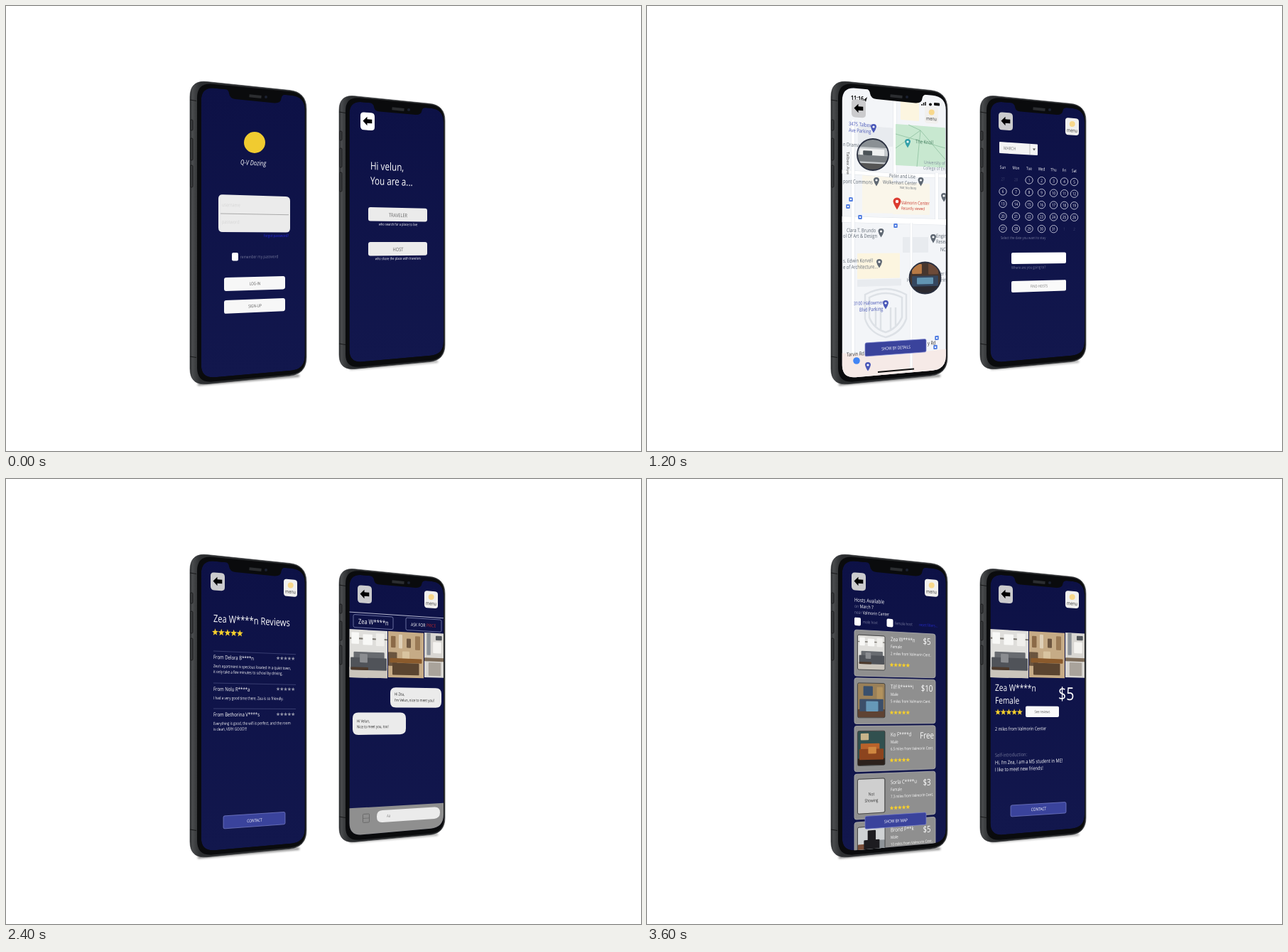
These frames come from a looping animation (894 by 626 pixels, 4800 ms). An HTML page:

```html
<!DOCTYPE html>
<html lang="en">
<head>
<meta charset="utf-8">
<title>App mockup</title>
<style>
html, body { margin: 0; width: 100%; height: 100%; overflow: hidden; background: #fff; }
svg { display: block; width: 894px; height: 626px; font-family: "Open Sans", "Noto Sans", sans-serif; }
</style>
</head>
<body>
<script>
const DIM = '#74789a', PALE = '#ebebeb', GOLD = '#f6cf2c', BTN = '#3a439c', INK = '#5f6873';

// Lines tilt with their height, as both phones are seen at an angle.
const tilt = y => (332 - y) / 2200;
const skew = (x, y, k = 1) => `transform="matrix(${k} ${k * tilt(y)} 0 1 ${x} ${y})"`;

function quad(x0, x1, tl, tr, bl, br, r) {
  const m = (tr - tl) / (x1 - x0) * r, n = (br - bl) / (x1 - x0) * r;
  return `M${x0} ${tl + r}Q${x0} ${tl} ${x0 + r} ${tl + m}L${x1 - r} ${tr - m}Q${x1} ${tr} ${x1} ${tr + r}` +
    `V${br - r}Q${x1} ${br} ${x1 - r} ${br - n}L${x0 + r} ${bl + n}Q${x0} ${bl} ${x0} ${bl - r}Z`;
}
const path = (d, fill = 'none', stroke = 'none', w = 1) =>
  `<path d="${d}" fill="${fill}" stroke="${stroke}" stroke-width="${w}"/>`;
const dot = (x, y, r, fill, stroke = 'none', w = 1) =>
  `<circle cx="${x}" cy="${y}" r="${r}" fill="${fill}" stroke="${stroke}" stroke-width="${w}"/>`;
const box = (x, y, w, h, r, fill, stroke, sw = .8) =>
  path(quad(x, x + w, y, y + tilt(y) * w, y + h, y + h + tilt(y + h) * w, r), fill, stroke, sw);
const text = (x, y, str, size, fill = '#fff', anchor = 'start', extra = '') =>
  `<text ${skew(x, y, .78)} font-size="${size}" fill="${fill}" text-anchor="${anchor}" ${extra}>${str}</text>`;
const mid = (x, y, str, size, fill) => text(x, y, str, size, fill, 'middle');
const rule = (x, y, w, color, sw = .7) => path(`M${x} ${y}l${w} ${tilt(y) * w}`, 'none', color, sw);

function star(x, y, r, fill) {
  let d = '';
  for (let i = 0; i < 10; i++) {
    const q = i % 2 ? r * .42 : r, a = i * Math.PI / 5;
    d += (i ? 'L' : 'M') + (x + q * .9 * Math.sin(a)) + ' ' + (y - q * Math.cos(a));
  }
  return path(d + 'Z', fill);
}
const stars = (x, y, step, r, fill = GOLD) =>
  [0, 1, 2, 3, 4].map(i => star(x + i * step, y + i * step * tilt(y), r, fill)).join('');

const pin = (x, y, color, r = 4) =>
  path(`M${x - r} ${y - 1}A${r} ${r} 0 1 1 ${x + r} ${y - 1}Q${x + r * .8} ${y + r * .7} ${x} ${y + r * 1.9}Q${x - r * .8} ${y + r * .7} ${x - r} ${y - 1}Z`, color) +
  dot(x, y - 1, r * .4, '#fff');

const back = (x, y, fill = '#cbcbcd') => box(x, y, 20, 25, 5, fill) +
  `<path ${skew(x + 10, y + 13)} d="M-6.5 0L-.5-6.2V-2.7H6.3V2.7H-.5V6.2Z" fill="#000"/>`;
const menu = (x, y) => box(x, y, 19, 24, 4, '#f1f0ee') + dot(x + 9.7, y + 9, 4, '#f8d88c') + mid(x + 9.5, y + 20.5, 'menu', 7, '#333');

// Scenes: a wall colour, then [left, top, width, height, colour] as shares of the picture.
const scenes = {
  grey: ['#dfdedb', [0, .17, 1, .03, '#77736d'], [.06, .06, .2, .24, '#f8f8f6'], [.36, .09, .25, .22, '#f8f8f6'], [.7, .06, .22, .26, '#f0efec'],
    [0, .78, 1, .22, '#cbc5bc'], [.12, .46, .8, .24, '#686b70'], [.04, .58, .94, .26, '#505359'], [.28, .5, .2, .18, '#8b8d91'], [.05, .78, .45, .06, '#4d3a2c']],
  work: ['#c6ab86', [.08, .1, .13, .25, '#8b6a48'], [.3, .06, .1, .3, '#dfd0b8'], [.52, .14, .12, .2, '#6d5640'], [.76, .08, .14, .3, '#9a7a56'],
    [0, .45, .25, .3, '#6a543e'], [.4, .42, .2, .18, '#d9c4a0'], [.05, .58, .9, .1, '#8a5a2c'], [.12, .68, .75, .26, '#5a4430']],
  bath: ['#d8d6d2', [.12, 0, .18, .5, '#8d9298'], [.42, .2, .4, .25, '#f4f3f0'], [.55, .06, .3, .1, '#53575c'], [0, .56, 1, .08, '#7b6a58'], [.2, .66, .6, .3, '#a9a39b']],
  blue: ['#9a8058', [.2, .08, .35, .28, '#39506d'], [.7, .1, .22, .4, '#b2925e'], [0, .76, 1, .24, '#5f4333'], [.06, .46, .88, .36, '#3c4f6a'], [.3, .52, .45, .3, '#6698b8']],
  rust: ['#31504f', [.1, .06, .3, .2, '#c7b48a'], [0, .8, 1, .2, '#2c211c'], [.1, .36, .7, .24, '#b8622b'], [.05, .52, .9, .32, '#8c441e'], [.38, .46, .3, .2, '#cf8740']],
  car: ['#c5c9cc', [0, 0, 1, .25, '#8a9094'], [.1, .3, .75, .2, '#eff0f0'], [.02, .5, .96, .2, '#777c80'], [.2, .36, .28, .14, '#4c5358'], [0, .75, 1, .25, '#555']],
  dusk: ['#46362e', [.1, .08, .3, .3, '#b87a45'], [.6, .05, .3, .35, '#6d4a38'], [0, .72, 1, .28, '#2c2a30'], [.1, .45, .8, .32, '#35475f'], [.25, .5, .5, .2, '#6294b1']],
  person: ['#cfd2d4', [0, .5, .3, .5, '#7a4f3a'], [.72, .4, .28, .6, '#8f9499'], [.36, .1, .3, .3, '#1d1c20'], [.22, .38, .58, .62, '#1d1c20']],
};
const photo = (x, y, w, h, name) => {
  const [wall, ...parts] = scenes[name];
  return box(x, y, w, h, 0, wall) + parts.map(p => box(x + p[0] * w, y + p[1] * h + tilt(y) * p[0] * w, p[2] * w, p[3] * h, 1, p[4])).join('');
};
const disc = (x, y, name) => `<clipPath id="${name}">${dot(x, y, 22)}</clipPath><g clip-path="url(#${name})">` +
  photo(x - 23, y - 23, 46, 46, name) + '</g>' + dot(x, y, 22, 'none', '#2a3040', 1.8);
const button = (x, y, w, h, label) => box(x, y, w, h, 2, BTN, '#7f86cf', .7) + mid(x + w / 2 + .5, y + h / 2 - .4, label, 6.2);
const strip = () => photo(483, 211, 54, 68, 'grey') + photo(538, 214, 50, 65, 'work') + photo(589, 216, 29, 63, 'bath');

function login() {
  return dot(350, 192, 15, '#f0cb30') + text(330, 223, 'Q-V Dozing', 9.6, '#fff', 'start', 'font-style="italic"') +
    box(299, 265, 101, 53, 6, PALE) + rule(302, 292, 96, '#9a9a9a', .8) +
    text(304, 282, 'username', 7, '#d6d6d6') + text(304, 306, 'password', 7, '#d6d6d6') +
    text(363, 325, 'forgot password?', 5.6, '#2429e0') +
    box(318, 347, 9, 11.5, 2, '#fff') + text(330, 355, 'remember my password', 6, DIM) +
    box(307, 382, 86, 19, 3, '#f7f7f7') + mid(350.5, 392.5, 'LOG-IN', 6, '#555') +
    box(307, 414, 86, 19, 3, '#f7f7f7') + mid(350.5, 424, 'SIGN-UP', 6, '#555');
}

function role() {
  return back(499, 149, '#fff') + text(513, 230, 'Hi velun,', 15) + text(513, 251, 'You are a...', 15) +
    box(510, 283, 83, 19.5, 3, PALE) + mid(552, 297, 'TRAVELER', 7.3, '#666') + mid(552, 309, 'who search for a place to live', 5.2) +
    box(510, 332, 83, 19.5, 3, PALE) + mid(552, 345, 'HOST', 7.3, '#666') + mid(552, 357, 'who share the place with travelers', 5.2);
}

function map() {
  const blue = '#4a58b8', pale = '#fcf5e0', block = '#e8ebef', red = '#c8372c';
  const road = (d, w = 5) => path(d, 'none', '#dfe3e8', w + 1) + path(d, 'none', '#fff', w);
  const lbl = (x, y, s, c = INK, size = 7.4) => text(x, y, s, size, c);
  const stops = [[287, 272], [283, 282], [300, 297], [350, 309], [408, 467], [406, 480]];
  return path('M270 100H430V530H270Z', '#f3f5f8') + path('M270 488L340 492 425 482V530H270Z', '#f6eae7') +
    box(297, 168, 49, 27, 1, block) + box(303, 236, 43, 55, 1, '#faf6ea') + box(357, 133, 26, 27, 1, pale) +
    box(346, 248, 52, 45, 1, '#faf6ea') + box(296, 348, 60, 36, 1, pale) + box(360, 325, 36, 22, 1, block) + box(296, 385, 62, 10, 1, block) +
    road('M274 233L345 238 421 239') + road('M274 300L421 304', 8) + road('M290 160V490', 4) + road('M349 110V235', 4) + road('M372 305V515', 3) + road('M408 235V300', 4) +
    box(350, 166, 70, 58, 1, '#c8e8d0') + path('M350 200L385 175 420 216M368 167L385 175 380 226M350 180L420 200', 'none', '#8fc0a0', .8) +
    path('M307 406Q336 390 365 406V440Q358 460 336 466Q313 460 307 440ZM313 410Q336 398 359 410V438Q352 454 336 459Q319 454 313 438ZM322 424V450M329 424V455M343 424V455M350 424V450', 'none', '#dde1e6', 2.5) +
    lbl(284, 168, '3475 Talbex', blue) + lbl(284, 177, 'Ave Parking', blue) + pin(319, 171, blue) +
    lbl(276, 197, 'n Drama C') + pin(367, 192, '#35a0a8') + lbl(378, 193, 'The Knoll', '#4b8064') +
    `<text transform="matrix(0 1 -.78 0 281 205)" font-size="6.5" fill="#444">Talbex Ave</text>` +
    lbl(390, 222, 'University of', '#7d8a99', 6.5) + lbl(389, 230, 'College of En', '#7d8a99', 6.5) +
    lbl(276, 249, 'pont Commons') + pin(323, 246, INK) + lbl(341, 241, 'Peter and Lise', INK, 7.2) +
    lbl(332, 250, 'Wolkenhart Center', INK, 7) + lbl(356, 257, 'Not too busy', INK, 5) + pin(385.5, 246, INK) + pin(418, 268, INK) +
    pin(352, 276, '#dc3b30', 5.5) + lbl(358, 279, 'Valmorin Center', red, 6.7) + lbl(358, 286.5, 'Recently viewed', red, 5.7) +
    lbl(281, 318, 'Clara T. Brundo') + lbl(276, 326, 'ol Of Art &amp; Design') + pin(329.5, 318, INK) +
    lbl(407, 326, 'Engin') + lbl(407, 334, 'Resea') + lbl(413, 345, 'NC') + pin(403, 326, INK) +
    lbl(276, 361, 's. Edwin Korvell') + lbl(276, 370, 'e of Architecture...') + pin(327, 361, INK) +
    lbl(366, 388, 'He') + lbl(411, 379, 'ter N') + lbl(411, 388, 'ering') +
    lbl(291, 421, '3100 Hallowmer', blue, 7) + lbl(299, 430, 'Blvd Parking', blue) + pin(336, 419, blue) +
    stops.map(([x, y]) => box(x - 2.7, y - 3, 5.4, 6, 1, '#4b79e0') + dot(x, y, 1.2, '#fff')).join('') +
    lbl(395, 477, 'y Rd', '#333') + lbl(281, 493, 'Tarvin Rd', '#333') + dot(295, 499, 4.8, '#4285f4') + pin(311, 506, blue) +
    disc(318, 209, 'car') + disc(391.5, 382.5, 'dusk') +
    text(287, 132, '11:16', 9, '#111', 'start', 'font-weight="700"') + path('M304 133l6-5-2 7-1.5-2.5Z', '#111') +
    path('M387 140v-2M389.5 140v-4M392 140v-5', 'none', '#111', 1.5) + dot(399, 138.5, 2, '#111') + box(404, 136, 8, 4, 1, '#111') +
    back(288, 131) + menu(391, 140.5) + button(307, 474, 86, 19, 'SHOW BY DETAILS') + path('M325 515L376 510.5', 'none', '#111', 2);
}

function calendar() {
  const cols = [501, 519.5, 538, 555.5, 572.5, 587.5, 601.5];
  let s = back(495, 149) + menu(589, 157) + box(496, 191, 54, 16, 1, '#f4f4f4') + text(502, 202, 'MARCH', 6.3, '#777') +
    path('M539 194v15', 'none', '#aaa', .7) + path('M543 200.5h4l-2 3Z', '#555');
  'Sun Mon Tue Wed Thu Fri Sat'.split(' ').forEach((d, i) => s += mid(cols[i], 229 + 5 * i / 6, d, 6));
  for (let i = 0; i < 35; i++) {
    const x = cols[i % 7], row = 243.5 + 17.4 * Math.floor(i / 7), y = row + tilt(row) * (x - 501);
    const on = i > 1 && i < 33, day = i < 2 ? 27 + i : on ? i - 1 : i - 32;
    s += (on ? dot(x, y, 5.2, 'none', '#e4e5f0', .8) : '') + mid(x, y + 2, day, 5.8, on ? '#fff' : '#3f446f');
  }
  return s + text(498, 328, 'Select the date you want to stay', 5.5, DIM) + box(513, 347, 77, 16, 2, '#fff') +
    text(513, 370, 'Where are you going to?', 5.5, DIM) + box(513, 387, 77, 16, 2, '#fafafa') + mid(552, 396, 'FIND HOSTS', 5.5, '#777');
}

function reviews() {
  const item = (y, who, starY, lines) => rule(292, y - 11, 116, '#4a5082') + text(292, y, 'From ' + who, 7.7) +
    stars(383, starY, 5.3, 2.9, '#9194a8') + lines.map((l, i) => text(292, y + 12 + i * 8, l, 5.85)).join('');
  return back(288, 131) + menu(391, 140.5) + text(292, 201, 'Zea W****n Reviews', 14.3) + stars(294.5, 215.5, 8.7, 5.2) +
    item(253, 'Delora B****n', 252, ["Zea's apartment is specious located in a quiet town,", 'it only take a few minutes to school by driving.']) +
    item(298, 'Nolu R****a', 295.5, ['I had a very good time there. Zea is so friendly.']) +
    item(334, 'Bethorina V****s', 331, ['Everything is good, the wifi is perfect, and the room', 'is clean, VERY GOOD!!!']) +
    button(306, 474, 87, 18, 'CONTACT');
}

function chat() {
  return back(495, 149) + menu(589, 157) + rule(483, 187, 135, '#c9cbe0', .9) +
    box(489, 190.5, 56, 18, 2, 'none', '#7f86b4') + text(496, 203.5, 'Zea W****n', 9.6) +
    box(563, 195, 50, 17.5, 2, 'none', '#7f86b4') + text(570, 207, 'ASK FOR', 6.6) + text(592, 208, 'PRICE', 6.3, '#b3262c') + strip() +
    box(541, 293, 72, 28.5, 8, PALE) + text(547, 304.5, 'Hi Zea,', 5.6, '#222') + text(547, 313, "I'm Velun, nice to meet you!", 5.6, '#222') +
    box(488, 328.5, 75, 31.5, 8, PALE) + text(494, 342.5, 'Hi Velun,', 5.6, '#222') + text(494, 350.5, 'Nice to meet you, too!', 5.6, '#222') +
    path('M480 463.5L620 455.5V510H480Z', '#8f8f8f') + box(502.5, 471.5, 9, 12, 1, 'none', '#666', .9) + rule(502.5, 477.5, 9, '#666') +
    box(522, 466.5, 89, 17, 8, PALE) + text(536, 476, 'Aa', 5.8, '#888');
}

function hosts() {
  const list = [['Zea W****n', 'Female', 2, '$5', 'grey'], ['Tilf R*****i', 'Male', 5, '$10', 'blue'], ['Ko F****d', 'Male', 6.5, 'Free', 'rust'],
    ['Sorla C****u', 'Female', 7.3, '$3'], ['Brond P**k', 'Male', 10, '$5', 'person']];
  const cards = list.map(([name, sex, miles, price, pic], i) => {
    const y = 212 + 67.8 * i, t = 228 + 67.1 * i;
    return box(292, y, 114, 65 - i * .4, 3, '#8f8f8f', '#b0b0b0') +
      (pic ? photo(297, y + 7.5, 38, 48, pic) : box(297, y + 7.5, 37, 48, 2, '#cfcfcf') + mid(316, y + 30, 'Not', 6.2, '#333') + mid(316, y + 39, 'Showing', 6.2, '#333')) +
      box(296.5, y + 7, 38.5, 49, 2, 'none', '#333', .8) +
      text(343, t, name, 7.8) + text(343, t + 9.8, sex, 6) + text(343, t + 19.5, miles + ' miles from Valmorin Cent.', 5.6) +
      stars(344.5, t + 33.5, 5.7, 3.4) + mid(394, 233 + 66 * i, price, 12.5);
  }).join('');
  return back(288, 131) + menu(391, 140.5) + text(292, 172.5, 'Hosts Available', 7.6) + text(292, 181, `<tspan fill="${DIM}">on</tspan> March 7`, 6.6) +
    text(292, 189.5, `<tspan fill="${DIM}">near</tspan> Valmorin Center`, 6.3) +
    box(292, 194.5, 9, 11.5, 2, '#fff') + text(304, 203, 'male host', 5.8, DIM) + box(337.5, 196.5, 9, 11.5, 2, '#fff') + text(349, 205, 'female host', 5.8, DIM) +
    text(383, 207, 'reset filters...', 5.6, '#2429c8') + cards + button(307, 474.5, 86, 18, 'SHOW BY MAP');
}

function profile() {
  return back(495, 149) + menu(589, 157) + strip() + text(490, 298, 'Zea W****n', 13) + text(490, 316, 'Female', 13) + text(579, 311, '$5', 25) +
    stars(494, 328, 7.7, 4.7) + box(533, 319.5, 47, 15.5, 2, '#fafafa') + mid(556.5, 329.3, 'See reviews', 5.2, '#555') +
    text(490, 354, '2 miles from Valmorin Center', 6.8) + text(490, 391, 'Self-introduction:', 7.2, DIM) +
    text(490, 401.5, "Hi, I'm Zea, I am a MS student in ME!", 7.25) + text(490, 411.5, 'I like to meet new friends!', 7.25) + button(512, 459, 78, 16, 'CONTACT');
}

function phone(id, body, front, screen, buttons, seams, notch, views) {
  const x = body[0], shape = quad(...screen);
  return path(quad(...body), 'url(#metal)', '#2b2d2f', .6) +
    buttons.map(([y, h]) => `<rect x="${x + .5}" y="${y}" width="3.5" height="${h}" rx="1.5" fill="#37393b" stroke="#151617" stroke-width=".8"/>`).join('') +
    seams.map(y => path(`M${x} ${y}l9 1.5`, 'none', '#191a1b', 1.2)).join('') +
    path(quad(...front), '#0a0b0d') + `<clipPath id="${id}">${path(shape)}</clipPath><g clip-path="url(#${id})">${path(shape, 'url(#night)')}` +
    views.map((v, i) => `<g class="v${i}">${v}</g>`).join('') + '</g>' + notch;
}
const shadow = (d, o) => `<path d="${d}" stroke="#000" stroke-width="3" opacity="${o}" filter="url(#soft)"/>`;
const speaker = (x, y) => path(`M${x} ${y}l17 1.6`, 'none', '#2b2d30', 4) + dot(x + 23.5, y + 1.8, 2, '#1b2130');

document.body.innerHTML = `<svg viewBox="0 0 894 626"><defs>
  <linearGradient id="metal"><stop stop-color="#2a2c2e"/><stop offset=".02" stop-color="#4a4c4e"/><stop offset=".05" stop-color="#3b3d3f"/><stop offset=".09" stop-color="#2b2d2f"/><stop offset=".96" stop-color="#2b2d2f"/><stop offset="1" stop-color="#46484a"/></linearGradient>
  <linearGradient id="night" x2="0" y2="1"><stop stop-color="#0d1146"/><stop offset="1" stop-color="#12174d"/></linearGradient>
  <filter id="soft" x="-10%" y="-100%" width="120%" height="300%"><feGaussianBlur stdDeviation="1.5"/></filter></defs>` +
  shadow('M270 532.5L413 520', .5) + shadow('M484 510.5L608 500', .35) +
  phone('left', [259, 423, 104, 121, 534, 518, 24], [269, 421.8, 107.5, 122.5, 530.5, 516.5, 22], [274.8, 420.8, 114, 127.5, 523.8, 511, 19],
    [[160, 15], [186, 31], [224, 31]], [132, 493],
    path('M308 115Q314 119 314 123Q315 130 323 131L378 136.5Q387 137 387.5 130Q388 125 394 124L394 122 308 114Z', '#0a0b0d') + speaker(342.5, 126.3),
    [login(), map(), reviews(), hosts()]) +
  phone('right', [469, 618, 124.5, 139.5, 512.5, 498.5, 22], [478, 616.8, 127.5, 140.5, 509.5, 497, 20], [483.5, 616, 133.5, 145.5, 502, 490, 18],
    [[176, 13], [200, 27], [234, 27]], [149, 475],
    path('M512 135.5Q518 138 518 142Q519 148 526 148.5L577 153Q585 153 585.5 147Q586 143.5 591 143L591 141 512 134Z', '#0a0b0d') + speaker(543.5, 144.3),
    [role(), calendar(), chat(), profile()]) + '</svg>';

const views = [0, 1, 2, 3].map(i => document.querySelectorAll('.v' + i));
function draw() {
  const now = Math.floor(performance.now() % 4800 / 1200);
  views.forEach((set, i) => set.forEach(g => g.style.display = i === now ? '' : 'none'));
  requestAnimationFrame(draw);
}
draw();
</script>
</body>
</html>
```
